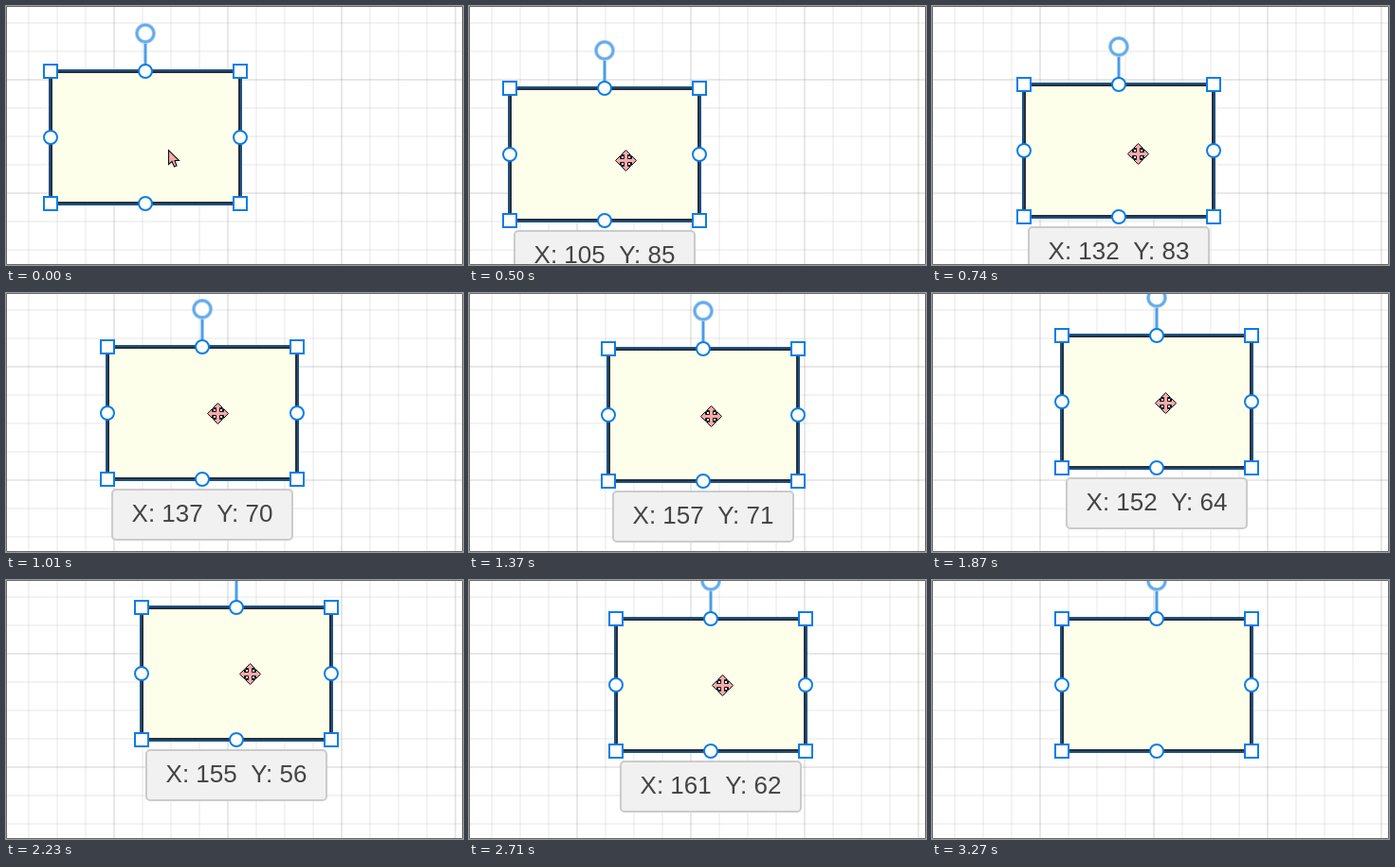
Animation, 482 px wide and 274 px high, one loop 3.44 s. Source, as an HTML page with a canvas:

```html
<!DOCTYPE html>
<html lang="en">
<head>
<meta charset="utf-8">
<title>Dragging a shape</title>
<style>
  html, body { margin: 0; width: 100%; height: 100%; overflow: hidden; background: #fff; }
  canvas { display: block; }
</style>
</head>
<body>
<canvas id="stage" width="482" height="274"></canvas>
<script>
const ctx = document.getElementById('stage').getContext('2d');
const W = 482, H = 274, LOOP = 3440;
const SHAPE_W = 200, SHAPE_H = 140;
const BLUE = '#0b7de6', PINK = '#f6aaaa';

// The picture advances in steps; a few steps last a little longer.
const REST = 260, STEP = 120, RELEASE = 22;
const pauses = { 5: 30, 11: 20, 20: 20, 21: 30, 23: 30 };

// Turning points [step, value] of the hand's swings; each leg between them is eased.
const swingX = [[-1, 107], [2, 105], [5, 141.4], [7, 132], [10, 165], [12, 145],
  [14.6, 166], [17, 149], [19.2, 164], [21.5, 152]];
const swingY = [[-1, 76], [3, 87], [6.1, 70], [8.5, 72], [11.2, 57], [13.5, 65],
  [16, 56], [18.5, 68], [20, 62]];
const gripX = [[-1, 124], [2.2, 122], [11, 106], [16, 114], [20, 112]];
const gripY = [[-1, 83], [2, 76], [6, 70], [11, 72], [16, 70]];

function swing(turns, step) {
  const next = turns.findIndex(([s]) => s > step);
  if (next < 0) return Math.round(turns.at(-1)[1]);
  const [s0, v0] = turns[next - 1], [s1, v1] = turns[next];
  const eased = (1 - Math.cos(Math.PI * (step - s0) / (s1 - s0))) / 2;
  return Math.round(v0 + (v1 - v0) * eased);
}

function stepAt(t) {
  let step = -1;
  for (let end = REST; t >= end; end += STEP + (pauses[step] ?? 0)) step++;
  return step;
}

function paint(fill, stroke, width) {
  if (fill) { ctx.fillStyle = fill; ctx.fill(); }
  if (stroke) { ctx.strokeStyle = stroke; ctx.lineWidth = width; ctx.stroke(); }
}

function box(x, y, w, h, fill, stroke, width, radius = 0) {
  ctx.beginPath();
  ctx.roundRect(x, y, w, h, radius);
  paint(fill, stroke, width);
}

function circle(x, y, r, fill, stroke, width) {
  ctx.beginPath();
  ctx.arc(x, y, r, 0, 2 * Math.PI);
  paint(fill, stroke, width);
}

function polygon(points, fill, stroke, width) {
  ctx.beginPath();
  points.forEach(([x, y]) => ctx.lineTo(x, y));
  ctx.closePath();
  paint(fill, stroke, width);
}

function drawGrid(x0, y0, gap) {
  ctx.fillStyle = 'rgba(0, 0, 0, 0.048)';
  for (let x = x0; x < W; x += gap) ctx.fillRect(x - 1, 0, 2, H);
  for (let y = y0; y < H; y += gap) ctx.fillRect(0, y - 1, W, 2);
}

function drawShape(x, y) {
  const cx = x + SHAPE_W / 2, cy = y + SHAPE_H / 2;
  const right = x + SHAPE_W, bottom = y + SHAPE_H;
  box(x, y, SHAPE_W, SHAPE_H, '#feffeb', '#262f37', 4);
  box(x - 1, y - 1, SHAPE_W + 2, SHAPE_H + 2, null, '#1f5285', 2);

  ctx.fillStyle = '#4a9de9';
  ctx.fillRect(cx - 1.5, y - 30, 3, 24);
  circle(cx, y - 40, 9, '#fff', '#a9cff4', 4);
  circle(cx, y - 40, 9, null, '#62aaec', 2.4);

  for (const hx of [x, right])
    for (const hy of [y, bottom]) box(hx - 7, hy - 7, 14, 14, '#fff', BLUE, 2);
  for (const [hx, hy] of [[cx, y], [cx, bottom], [x, cy], [right, cy]])
    circle(hx, hy, 7, '#fff', BLUE, 2);
}

function drawLabel(x, y, text) {
  box(x + 5, y + 151, 190, 53, '#f1f1f1', '#cbcbcb', 2, 4);
  ctx.font = '26px "Liberation Sans", Arial, sans-serif';
  ctx.textAlign = 'center';
  ctx.fillStyle = '#444';
  ctx.fillText(text, x + 100, y + 185);
}

function drawArrow() {
  polygon([[0, 0], [0, 15], [3.5, 12], [6, 17.5], [8.5, 16.5], [6.5, 11], [11, 11]],
    PINK, '#111', 1.1);
}

function drawMove() {
  box(-5, -5, 10, 10, '#fff', '#111', 1);
  const arm = [[-2, -2], [-2, -6], [-5, -6], [0, -11], [5, -6], [2, -6]];
  const turn = ([x, y], n) => n ? turn([-y, x], n - 1) : [x, y];
  polygon([0, 1, 2, 3].flatMap(n => arm.map(p => turn(p, n))), PINK, '#111', 1);
}

function draw(step) {
  const x = swing(swingX, step), y = swing(swingY, step);
  const left = 2 * x - 167, top = 2 * y - 83;
  const dragging = step >= 0 && step < RELEASE;
  const away = step - RELEASE;
  const pointer = away < 0
    ? [left + swing(gripX, step), top + swing(gripY, step)]
    : [308 + 78 * away, 180 + 85 * away];

  ctx.fillStyle = '#fff';
  ctx.fillRect(0, 0, W, H);
  drawGrid(24, 18, 30);
  drawGrid(114, 78, 120);
  drawShape(left, top);
  if (dragging) drawLabel(left, top, `X: ${x}  Y: ${y}`);
  box(0.5, 0.5, W - 1, H - 1, null, '#686868', 1);

  ctx.save();
  ctx.translate(pointer[0] + 0.5, pointer[1] + 0.5);
  dragging ? drawMove() : drawArrow();
  ctx.restore();
}

const start = performance.now();
function tick() {
  draw(stepAt((performance.now() - start) % LOOP));
  requestAnimationFrame(tick);
}
tick();
</script>
</body>
</html>
```
